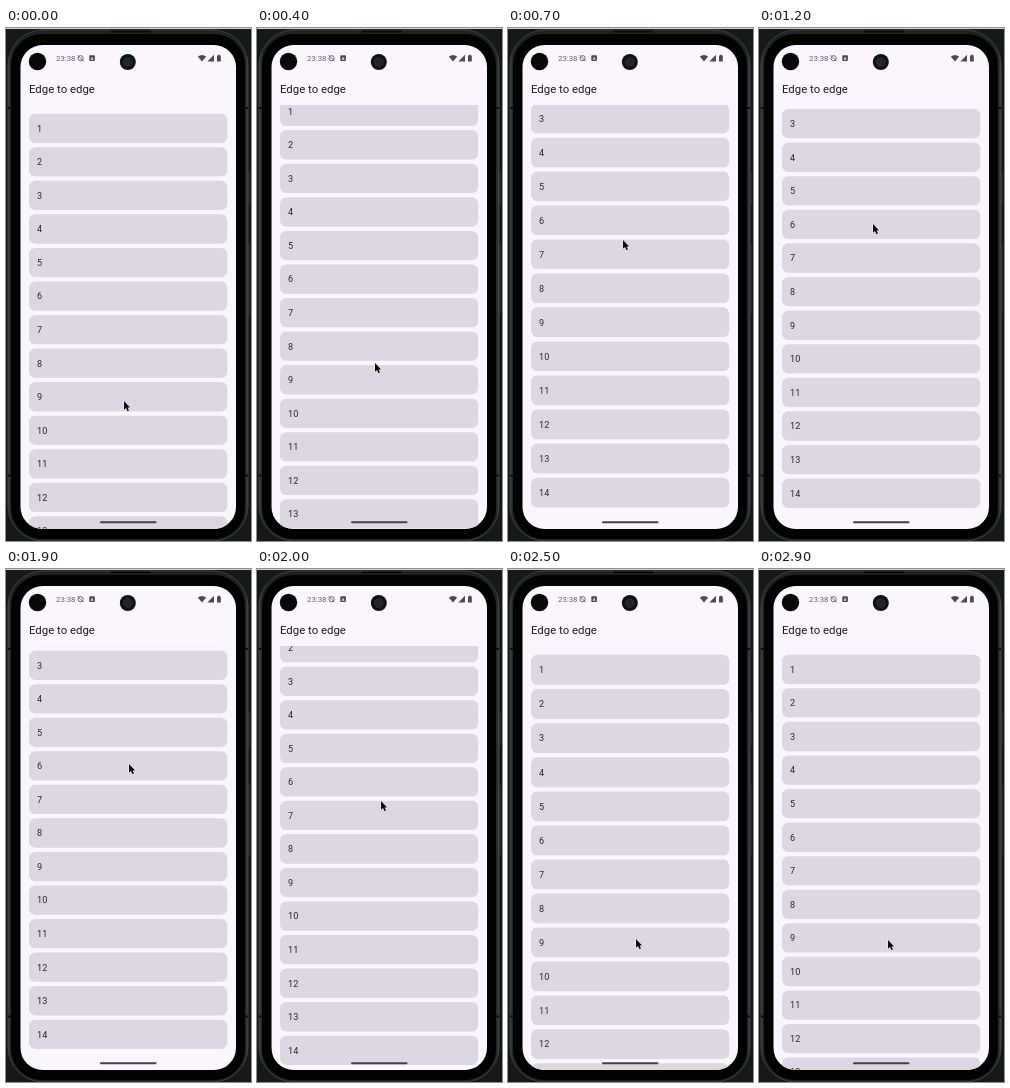
These frames come from a looping animation (245x513 px, 3000 ms). An HTML page:

```html
<!DOCTYPE html>
<html lang="en">
<head>
<meta charset="utf-8">
<title>Edge to edge</title>
<style>
  html, body { margin: 0; width: 100%; height: 100%; overflow: hidden; background: #15191a; }
  svg { display: block; width: 245px; height: 513px; font-family: Roboto, sans-serif; }
  .title { font-size: 11.4px; fill: #1d1b20; }
  .clock { font-size: 7.8px; fill: #66626b; }
  .card rect { fill: #ddd7e2; }
  .card text { font-size: 9.1px; letter-spacing: .25px; fill: #27242b; }
</style>
</head>
<body>
<svg viewBox="0 0 245 513">
  <defs>
    <clipPath id="screen"><rect x="14.5" y="17" width="215.5" height="484" rx="22"/></clipPath>
    <clipPath id="view"><rect x="14" y="77" width="217" height="424"/></clipPath>
    <linearGradient id="rim">
      <stop offset="0" stop-color="#3c4041"/>
      <stop offset=".012" stop-color="#202324"/>
      <stop offset=".988" stop-color="#202324"/>
      <stop offset="1" stop-color="#3c4041"/>
    </linearGradient>
  </defs>

  <rect width="245" height="513" fill="#15191a"/>
  <rect width="245" height="1" fill="#d4d5d5"/>
  <rect x="241" y="144" width="3" height="33" rx="1" fill="#25292a"/>
  <rect x="241" y="216" width="3" height="70" rx="1" fill="#25292a"/>
  <rect x="2" y="2" width="240" height="511" rx="35" fill="url(#rim)" stroke="#44494a" stroke-width=".8"/>
  <path d="M105 3.5H145M2 80H6M238 80H242M2 447.5H6M238 447.5H242" stroke="#0b0d0d" stroke-width="2"/>
  <rect x="5" y="6" width="234" height="505" rx="31" fill="#010202"/>

  <g clip-path="url(#screen)">
    <rect x="14" y="17" width="217" height="485" fill="#fbf5fd"/>
    <g id="list" clip-path="url(#view)"></g>
    <text class="title" x="23" y="64.7">Edge to edge</text>
    <text class="clock" x="50" y="33">23:38</text>

    <g fill="none" stroke="#5d5963" stroke-width=".9">
      <circle cx="74.6" cy="30.2" r="2.6"/>
      <path d="M71.6 27.2L77.6 33.2"/>
    </g>
    <rect x="83.3" y="27.2" width="5.6" height="5.8" rx=".8" fill="#4b4850"/>
    <path d="M86.1 28.4L87.6 31.7H84.6Z" fill="#d8d3dc"/>
    <g fill="#4d4a52">
      <path d="M191.8 28.6Q196 25.3 200.2 28.6L196 33.5Z"/>
      <path d="M208 26.8V33.4H201.4Z"/>
      <path d="M211 27.5H212V26.7H213.8V27.5H214.8V33.5H211Z"/>
    </g>

    <rect x="94" y="493.3" width="56.5" height="2" rx="1" fill="#444147"/>
  </g>

  <circle cx="31.5" cy="33.5" r="8.7" fill="#080809"/>
  <circle cx="121.8" cy="34" r="8" fill="#101112"/>
  <circle cx="121.8" cy="34" r="4.3" fill="#222426" stroke="#303234" stroke-width=".8"/>

  <path id="cursor" d="M0 0V8.7L2 6.9L3.5 10.2L5 9.5L3.6 6.4H6.2Z" fill="#080808" stroke="#fff" stroke-width=".8" paint-order="stroke"/>
</svg>

<script>
const LOOP = 3000, STEP = 100, COUNT = 14;
const TOP = 77, BOTTOM = 501, FIRST = 85.7, PITCH = 33.55, CARD = 29.3;
const MAX = 71.2, SLOP = 21;

// Pointer path: time, x, y
const path = [
  [0, 118, 373], [200, 118, 373], [300, 118, 358], [400, 118, 335],
  [500, 117, 287], [600, 116, 240], [700, 115, 212], [900, 114, 199],
  [1200, 114, 196], [1500, 117, 195], [1900, 123, 195], [2000, 124, 232],
  [2100, 125, 292], [2200, 126, 337], [2300, 127, 359], [2500, 128, 370],
  [2600, 128, 370], [2900, 129, 371]
];

const NS = 'http://www.w3.org/2000/svg';
const list = document.getElementById('list');
const cursor = document.getElementById('cursor');

function add(parent, tag, attrs) {
  const el = document.createElementNS(NS, tag);
  for (const key in attrs) el.setAttribute(key, attrs[key]);
  return parent.appendChild(el);
}

const cards = Array.from({ length: COUNT }, (_, i) => {
  const g = add(list, 'g', { class: 'card' });
  const box = add(g, 'rect', { x: 23, width: 198.3, rx: 6.3 });
  const label = add(g, 'text', { x: 31 });
  label.textContent = i + 1;
  return { box, label };
});

function pointer(t) {
  let i = 1;
  while (i < path.length - 1 && path[i][0] < t) i++;
  const [t0, x0, y0] = path[i - 1], [t1, x1, y1] = path[i];
  const k = (t - t0) / (t1 - t0);
  return { x: x0 + (x1 - x0) * k, y: y0 + (y1 - y0) * k };
}

const drag = (t, from) => Math.max(0, Math.abs(pointer(t).y - from) - SLOP);
const stretch = d => 6.4 * (1 - Math.exp(-Math.max(0, d - MAX) / 30));

// Scroll offset plus overscroll pull: negative at the end, positive at the start
function scrollAt(t) {
  const up = t < 1800;
  const release = up ? 900 : 2600;
  const d = drag(Math.min(t, release), up ? 373 : 195);
  const fade = t > release ? Math.exp((release - t) / (up ? 130 : 90)) : 1;
  const moved = Math.min(d, MAX);
  return {
    offset: up ? moved : MAX - moved,
    pull: (up ? -1 : 1) * stretch(d) * fade
  };
}

function warp(y, pull) {
  const u = (pull < 0 ? BOTTOM - y : y - TOP) / (BOTTOM - TOP);
  return y + pull * u * (1.4 - .4 * u);
}

function draw(t) {
  const { offset, pull } = scrollAt(t);
  cards.forEach(({ box, label }, i) => {
    const y = FIRST + i * PITCH - offset;
    const top = warp(y, pull), end = warp(y + CARD, pull);
    box.setAttribute('y', top);
    box.setAttribute('height', end - top);
    label.setAttribute('y', (top + end) / 2 + 3.3);
  });
  const { x, y } = pointer(t);
  cursor.setAttribute('transform', `translate(${x} ${y})`);
}

function tick() {
  draw(Math.floor(performance.now() % LOOP / STEP) * STEP);
  requestAnimationFrame(tick);
}
tick();
</script>
</body>
</html>
```
